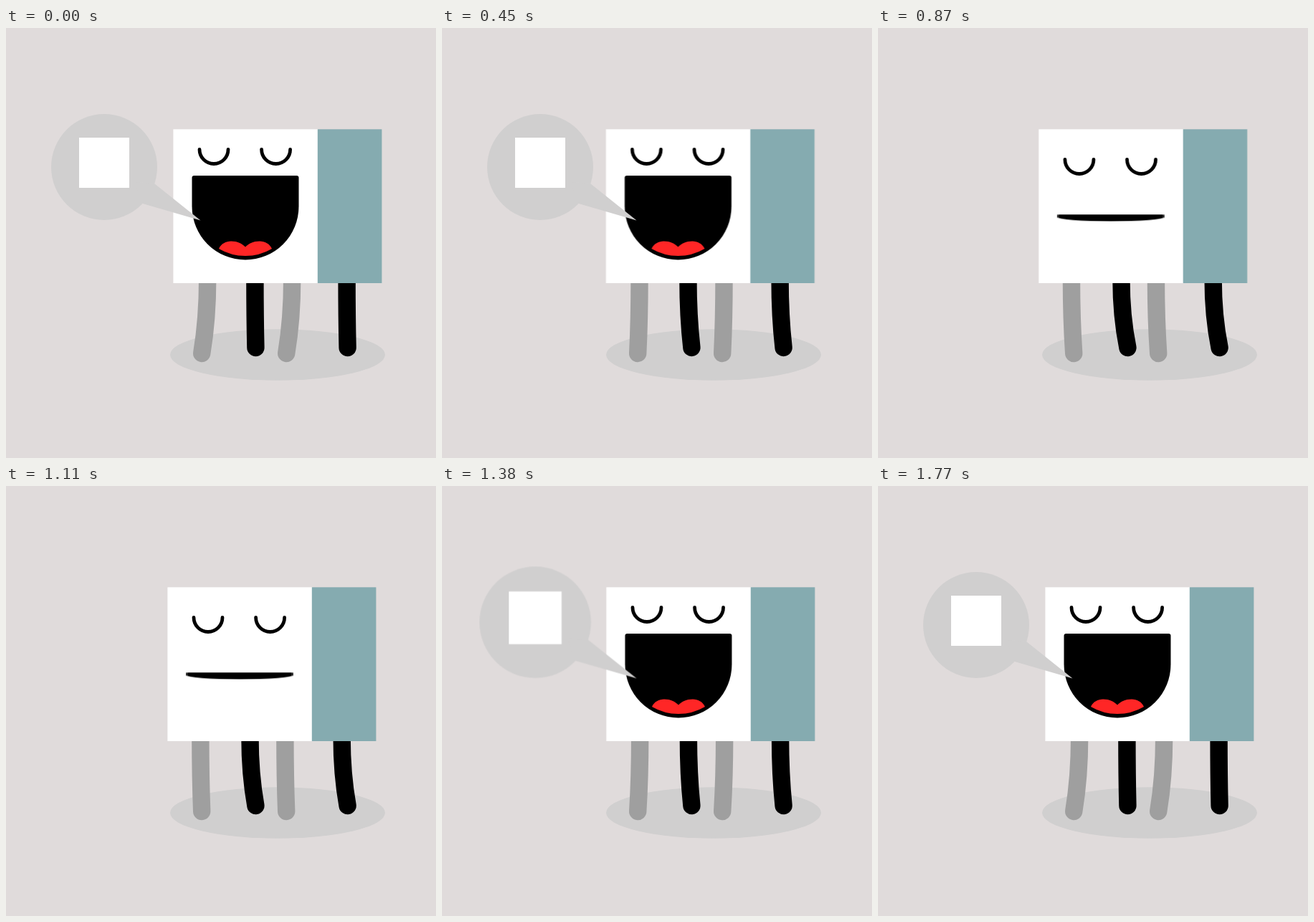
These frames come from a looping animation (600 px wide and 600 px high, 1800 ms). An HTML page without scripts:

```html
<!DOCTYPE html>
<html lang="en">
<head>
<meta charset="utf-8">
<title>Singing cube</title>
<style>
  html, body {
    margin: 0;
    width: 100%;
    height: 100%;
    overflow: hidden;
    background: #e0dbdb;
  }
  svg { display: block; width: 100%; height: 100%; }

  .sway, .leg, .lips, .tongue, .eyes, .bubble {
    animation: 1.8s cubic-bezier(.364, 0, .636, 1) infinite;
  }

  /* Body sway; the feet stay planted */
  .sway { animation-name: sway; }
  @keyframes sway { 50% { transform: translateX(-9.2px); } }

  .leg { fill: none; stroke-width: 24.4; stroke-linecap: round; }
  .far { stroke: #9f9f9f; animation-name: far; }
  .near { stroke: #000; animation-name: near; }
  @keyframes far {
    0%, 100% { d: path("M8 -104Q8 -48 0 0"); }
    50% { d: path("M-3.3 -104Q-3.3 -48 0 0"); }
  }
  @keyframes near {
    0%, 100% { d: path("M-1 -96Q-1 -44 0 0"); }
    50% { d: path("M-9 -96Q-9 -44 0 0"); }
  }

  /* Face: mouth shuts while the eyes drop */
  .lips { transform-origin: 334px 265px; animation-name: lips; }
  .tongue { animation-name: tongue; }
  .eyes { animation-name: eyes; }
  @keyframes lips {
    0%, 30.83%, 73.33%, 100% { transform: scaleY(1); }
    41.11%, 63.33% { transform: scaleY(.08); }
  }
  @keyframes tongue {
    0%, 30.83%, 73.33%, 100% { transform: translateY(0); }
    41.11%, 63.33% { transform: translateY(-14px); }
  }
  @keyframes eyes {
    0%, 30.83%, 73.33%, 100% { transform: translateY(0); }
    41.11%, 63.33% { transform: translateY(14px); }
  }

  /* Bubble fades, then pops out of the mouth */
  .bubble { transform-origin: 271.5px 268.5px; animation-name: bubble; }
  @keyframes bubble {
    0%, 30.83% { opacity: 1; transform: scale(1); }
    41.11%, 63.32% { opacity: 0; transform: scale(1); }
    63.33% { opacity: 1; transform: scale(0); }
    74.44% { opacity: 1; transform: scale(1.107); }
    78.89%, 100% { opacity: 1; transform: scale(1); }
  }
</style>
</head>
<body>
<svg viewBox="0 0 600 600">
  <defs>
    <path id="mouth" d="M262.5 206H405.5Q408.5 206 408.5 209V249A74.5 74.5 0 0 1 259.5 249V209Q259.5 206 262.5 206Z"/>
    <clipPath id="inside">
      <path class="lips" d="M262.5 206H405.5Q408.5 206 408.5 209V249A74.5 74.5 0 0 1 259.5 249V209Q259.5 206 262.5 206Z"/>
    </clipPath>
    <path id="eye" d="M-20 0A20 20 0 0 0 20 0"/>
  </defs>

  <ellipse cx="379" cy="456" rx="150" ry="35.7" fill="#d0cfcf"/>

  <g transform="translate(273.2 454)"><path class="leg far" d="M8 -104Q8 -48 0 0"/></g>
  <g transform="translate(391.2 454)"><path class="leg far" d="M8 -104Q8 -48 0 0"/></g>
  <g transform="translate(348.4 446)"><path class="leg near" d="M-1 -96Q-1 -44 0 0"/></g>
  <g transform="translate(476.6 446)"><path class="leg near" d="M-1 -96Q-1 -44 0 0"/></g>

  <g class="sway">
    <rect x="233.4" y="141.3" width="202" height="214.7" fill="#fff"/>
    <rect x="434.8" y="141.3" width="89.6" height="214.7" fill="#85abb0"/>
    <g class="eyes" fill="none" stroke="#000" stroke-width="4.8" stroke-linecap="round">
      <use href="#eye" x="290" y="169.5"/>
      <use href="#eye" x="376.6" y="169.5"/>
    </g>
    <g class="lips"><use href="#mouth"/></g>
    <g clip-path="url(#inside)">
      <path class="tongue" fill="#ff2626" d="M297 308C300 301 307 297.5 314 297.5C323 297.5 329 300.5 334 305.5C339 300.5 345 297.5 354 297.5C361 297.5 368 301 371 308Q354 318 334 318Q314 318 297 308Z"/>
    </g>
  </g>

  <g class="bubble">
    <g fill="#d0cfcf">
      <circle cx="137" cy="194" r="74"/>
      <path d="M189 244.5L271.5 268.5L207 217L180 215Z"/>
    </g>
    <rect x="102" y="153" width="70" height="70" fill="#fff"/>
  </g>
</svg>
</body>
</html>
```
